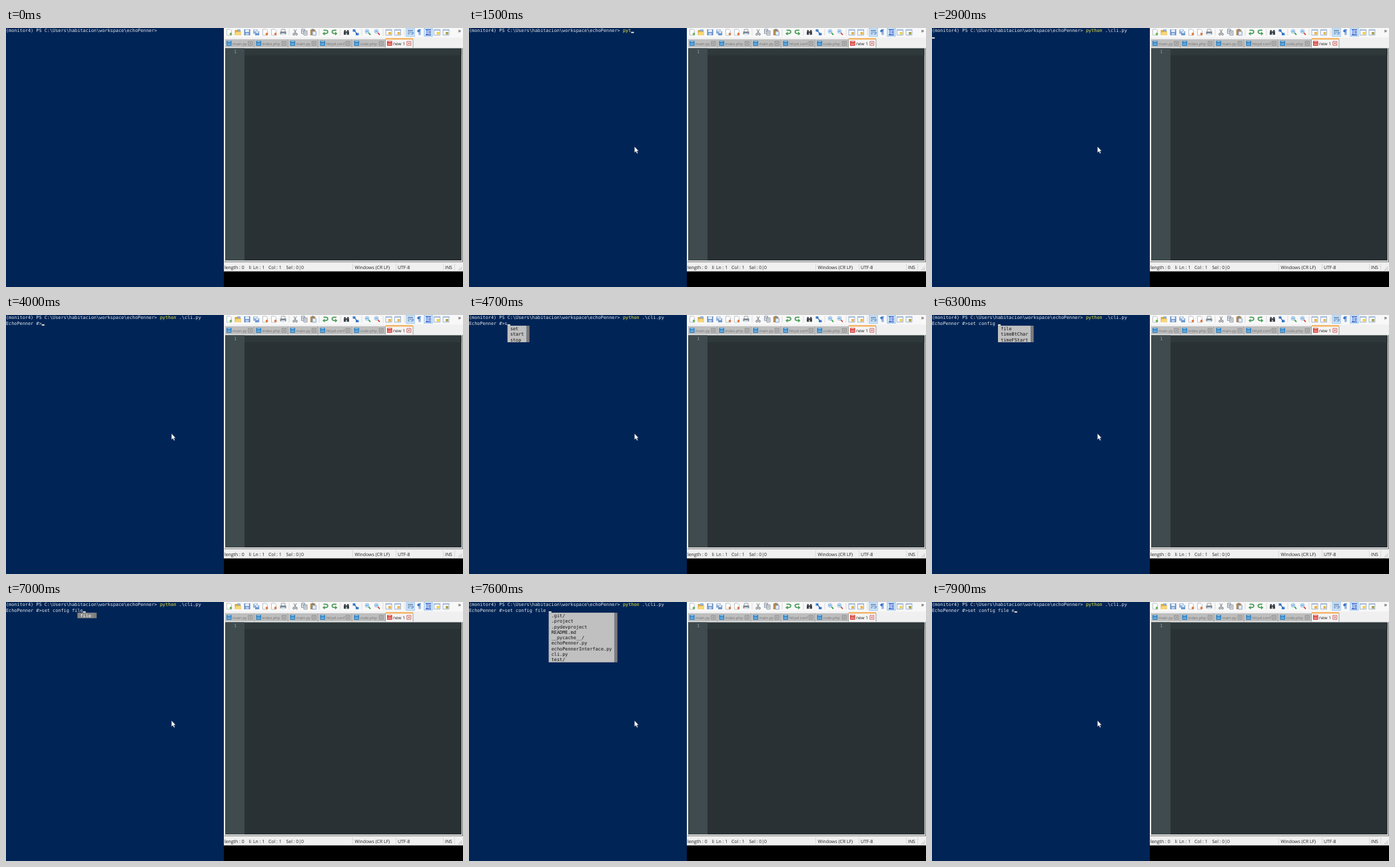
Animation, 686 px wide and 390 px high, one loop 8 s. Source, as an HTML page:

```html
<!DOCTYPE html>
<html lang="en">
<head>
<meta charset="utf-8">
<title>Terminal and editor</title>
<style>
  html, body { margin: 0; width: 100%; height: 100%; overflow: hidden; background: #000; }
  svg { display: block; width: 686px; height: 390px; }
  text { white-space: pre; text-rendering: geometricPrecision; }
  .mono { font: 6.85px "DejaVu Sans Mono", "Liberation Mono", monospace; }
  .ui { font: 6.9px "Open Sans", "Noto Sans", sans-serif; }
</style>
</head>
<body>
<svg id="stage" viewBox="0 0 686 390"></svg>
<script>
const NS = "http://www.w3.org/2000/svg";
const stage = document.getElementById("stage");
const LOOP = 8000, CW = 4.125, RH = 8.3;

function add(tag, attrs, parent = stage) {
  const el = document.createElementNS(NS, tag);
  for (const k in attrs) el.setAttribute(k, attrs[k]);
  return parent.appendChild(el);
}
const rect = (x, y, width, height, fill, parent) => add("rect", { x, y, width, height, fill }, parent);
const line = (d, stroke, w = 1, parent) => add("path", { d, stroke, fill: "none", "stroke-width": w }, parent);
const shape = (d, fill, parent) => add("path", { d, fill }, parent);
function label(str, x, y, fill, size) {
  const el = add("text", { x, y, fill, class: "ui" });
  if (size) el.style.fontSize = size + "px";
  el.textContent = str;
}
function mono(str, col, row, fill, parent) {
  const el = add("text", { x: col * CW, y: 6.3 + row * RH, fill, class: "mono" }, parent);
  el.textContent = str;
  return el;
}

/* ---------- editor window ---------- */
rect(327, 0, 359, 366.5, "#f0f0f0");
rect(327, 0, 359, 14.5, "#f8f8f8");

const icons = {
  page(x, mark) {
    shape(`M${x - 3.5} 2h5l2 2v7h-7z`, "#fff");
    line(`M${x - 3.5} 2h5l2 2v7h-7z`, "#a3abb2", .7);
    add("circle", { cx: x + 2.5, cy: 9, r: 1.9, fill: mark });
  },
  folder(x) {
    shape(`M${x - 4.5} 3h4l1 1.5h4v6.5h-9z`, "#d9a741");
    shape(`M${x - 3} 6h8l-1.5 5h-8z`, "#f7d778");
    rect(x - 1, 2, 5, 3, "#8db4dc");
  },
  disk(x) {
    rect(x - 4.5, 2, 9, 9, "#5d88c6");
    rect(x - 2.9, 2.4, 5.8, 3.8, "#e8f1fb");
    rect(x - 2.5, 7.5, 5, 3, "#c6d8ee");
  },
  disks(x) {
    for (const d of [-4.5, -2]) {
      rect(x + d, d + 6.5, 7, 7, "#fff");
      rect(x + d + .4, d + 6.9, 6.2, 6.2, "#6d97cc");
      rect(x + d + 1.6, d + 7.3, 3.8, 2.3, "#eaf2fb");
    }
  },
  printer(x) {
    rect(x - 2.8, 2, 5.6, 4, "#fff");
    line(`M${x - 2.8} 5.5v-3.5h5.6v3.5`, "#7f8a94", .8);
    rect(x - 4.5, 5.3, 9, 4.2, "#7b8791");
    rect(x - 2.8, 8, 5.6, 3, "#dde6ee");
  },
  cut(x) {
    line(`M${x - 2} 2l3.2 6M${x + 2} 2l-3.2 6`, "#7d858c", 1);
    for (const s of [-2, 2]) add("circle", { cx: x + s, cy: 9.4, r: 1.4, fill: "none", stroke: "#66707a" });
  },
  copy(x) {
    for (const [dx, dy] of [[-4, 1.8], [-.5, 4.3]]) {
      rect(x + dx, dy, 5, 6.5, "#f2f6fb");
      line(`M${x + dx} ${dy}h5v6.5h-5zM${x + dx + 1} ${dy + 2}h3m-3 2h3`, "#707c8c", .8);
    }
  },
  paste(x) {
    rect(x - 4.2, 2.3, 7.5, 8.7, "#b98a4a");
    rect(x - 2.2, 1.5, 3.5, 2, "#77808a");
    rect(x - 1, 5, 5.4, 6, "#e4eefa");
    line(`M${x - 1} 5h5.4v6h-5.4z`, "#5f83b8", .7);
  },
  turn(x, s) {
    line(`M${x - 3 * s} 3.4h${3.5 * s}q${3 * s} 0 ${3 * s} 2.4t${-3 * s} 2.6h${-2 * s}`, "#4c9d5b", 1.6);
    shape(`M${x - 4.5 * s} 8.4l${3.5 * s} -2.8v5.6z`, "#4c9d5b");
  },
  find(x) {
    for (const d of [-4, .6]) {
      rect(x + d + .6, 3, 2.2, 3, "#3b4148");
      rect(x + d, 5.2, 3.4, 5, "#3b4148");
    }
    rect(x - 1, 5.2, 2, 2, "#3b4148");
  },
  replace(x) {
    rect(x - 4.5, 2, 4, 3.5, "#3c7ed0");
    rect(x, 7.5, 4.5, 3.5, "#3c7ed0");
    line(`M${x - 2} 4l4 5`, "#28559b", 1.2);
  },
  zoom(x, c) {
    line(`M${x + 1} 7l3 3.4`, c, 1.8);
    add("circle", { cx: x - 1, cy: 5, r: 2.9, fill: "#d8ebfa", stroke: "#7fb0da", "stroke-width": .8 });
    rect(x - 2.5, 4.3, 3, 1.4, "#4a8fd0");
  },
  pane(x, mark) {
    rect(x - 4.5, 2, 9, 8.8, "#fdfdfd");
    line(`M${x - 4.5} 2.3h9v8.5h-9zM${x - 4.5} 3.4h9`, "#86a3c8", .8);
    rect(x - .5, 6, 4, 3.8, mark);
  },
  pressed(x) {
    rect(x - 6.2, .2, 12.4, 12.4, "#cfe5f9");
    line(`M${x - 6.2} .2h12.4v12.4h-12.4z`, "#80b7e8", .7);
  },
  wrap(x) {
    icons.pressed(x);
    line(`M${x - 4} 3.5h8M${x - 4} 6h5M${x - 4} 8.7h3`, "#4c6790", 1.1);
    line(`M${x + 1} 6h3v3h-3.5`, "#3a74c4", 1);
  },
  pilcrow(x) {
    line(`M${x} 2.5v8M${x + 1.8} 2.5v8M${x - 1} 2.6h4`, "#3a76c8", .9);
    add("circle", { cx: x - .8, cy: 4.5, r: 1.9, fill: "#3a76c8" });
  },
  indent(x) {
    icons.pressed(x);
    line(`M${x - 4} 2.5h8M${x} 5h4M${x} 7.5h4M${x - 4} 10.3h8`, "#1d3fb8", 1.2);
    line(`M${x - 2} 2.5v8`, "#2b56dd", 1);
  }
};

icons.page(335, "#69b35e");
icons.folder(348);
icons.disk(362);
icons.disks(375.5);
icons.page(389, "#e07840");
icons.page(402, "#e07840");
icons.printer(416);
icons.cut(434);
icons.copy(447.5);
icons.paste(461);
icons.turn(479.5, 1);
icons.turn(493, -1);
icons.find(511);
icons.replace(525);
icons.zoom(543, "#3b9d46");
icons.zoom(557, "#d2453c");
icons.pane(574.5, "#e8b64c");
icons.pane(588, "#e8b64c");
icons.wrap(607);
icons.pilcrow(620);
icons.indent(634);
icons.pane(647, "#f0cf45");
icons.pane(660.5, "#a6a452");
for (const x of [425, 470, 502, 534, 566, 598]) line(`M${x} 1.5v10`, "#d2d2d2", .8);
label("»", 678.5, 6.5, "#222", 9);

function tab(x, w, name, active) {
  rect(x, active ? 15.5 : 17, w, active ? 14 : 12, active ? "#f4f4f4" : "#bebebe");
  line(`M${x + w} 17v12.5`, "#8f8f8f", .8);
  if (active) rect(x, 15.5, w, 1.8, "#f6a23a");
  rect(x + 2, 19.5, 7.6, 7.2, active ? "#d8423c" : "#2c82c4");
  rect(x + 3.6, 19.8, 4.4, 1.6, active ? "#efa39e" : "#86bee6");
  rect(x + 3.2, 23.6, 5.2, 1.3, active ? "#f3c4c0" : "#a5cdea");
  label(name, x + 11, 25.6, active ? "#222" : "#747474", active ? 6.5 : 5.8);
  const cx = x + w - 6.2, k = active ? "#c9504c" : "#858585";
  line(`M${cx - 3} 20.2h6v6h-6z`, k, .8);
  line(`M${cx - 1.5} 21.7l3 3m0 -3l-3 3`, k, .9);
}
tab(329, 44, "main.py");
tab(373.5, 50, "index.php");
tab(424.5, 44, "main.py");
tab(469.5, 50, "httpd.conf");
tab(520.5, 49, "code.php");
tab(570, 41, "new 1", true);

// Light bevel around the text area, with a grey outer edge.
line("M685.5 30v322H328", "#6c6c6c", 1);
rect(329, 30.5, 354.8, 319.5, "#293134");
rect(329, 30.5, 29, 319.5, "#3f4b4e");
rect(358, 31, 325.8, 10, "#2f393c");
mono("1", 342 / CW, 3.85, "#8a9da1");

const status = [[328, "length : 0"], [364.5, "li"], [371, "Ln : 1"], [394, "Col : 1"], [420.5, "Sel : 0|0"],
  [523.5, "Windows (CR LF)"], [588, "UTF-8"], [659, "INS"]];
for (const [x, s] of status) label(s, x, 362.6, "#1c1c1c");
for (const x of [520.5, 585.5, 656.5, 673.5]) line(`M${x} 354.5v10`, "#d4d4d4", .8);
for (let i = 0; i < 3; i++)
  for (let j = 0; j <= i; j++) rect(683 - j * 2, 359.5 + i * 2, 1.1, 1.1, "#b0b0b0");

/* ---------- terminal ---------- */
rect(0, 0, 327, 390, "#012456");
const FG = "#e6e8ea";
mono("(monitor4) PS C:\\Users\\habitacion\\workspace\\echoPenner>", 0, 0, FG);
const command = mono("", 56, 0, "#f3ee3f");
const args = mono("", 62, 0, FG);
const input = mono("", 0, 1, FG);
const caret = rect(0, 0, CW, 1.8, "#f2f0d8");
const popup = add("g", {});
const mouse = add("path", {
  d: "M248.4 178.4v9.4l2.1-2 1.5 3.3 1.5-.7-1.5-3.2h2.6z",
  fill: "#fff", stroke: "#14213a", "stroke-width": .3
});

const PS = "EchoPenner #>";
const VERBS = ["set", "start", "stop"];
const KEYS = ["file", "timeBtChar", "timeFStart"];
const FILES = [".git/", ".project", ".pydevproject", "README.md", "__pycache__/",
  "echoPenner.py", "echoPennerInterface.py", "cli.py", "test/"];

// [time, shell input, prompt line, menu items, menu column, item selected]
// A null prompt line keeps the caret on the shell line.
const RUN = "python .\\cli.py";
const steps = [
  [0, "", null],
  [1200, "", null],
  [1300, "p", null],
  [1400, "py", null],
  [1500, "pyt", null],
  [1600, "pyth", null],
  [1800, RUN, null],
  [2700, RUN, ""],
  [3300, RUN, PS],
  [4700, RUN, PS + "s", VERBS, 14],
  [4800, RUN, PS + "se", ["set"], 15],
  [4900, RUN, PS + "set"],
  [5000, RUN, PS + "set", ["set"], 16],
  [5300, RUN, PS + "set "],
  [5400, RUN, PS + "set ", ["config"], 17],
  [5500, RUN, PS + "set c", ["config"], 18],
  [5600, RUN, PS + "set co", ["config"], 19],
  [5700, RUN, PS + "set con", ["config"], 20],
  [5900, RUN, PS + "set config", ["config"], 20, true],
  [6300, RUN, PS + "set config ", KEYS, 24],
  [6600, RUN, PS + "set config f", ["file"], 25],
  [6700, RUN, PS + "set config fi", ["file"], 26],
  [6900, RUN, PS + "set config file", ["file"], 26, true],
  [7200, RUN, PS + "set config file "],
  [7300, RUN, PS + "set config file ", FILES, 29],
  [7800, RUN, PS + "set config file e"]
];

function drawMenu(items, col, picked) {
  popup.replaceChildren();
  if (!items) return;
  const width = (Math.max(...items.map(s => s.length)) + 2) * CW;
  const x = col * CW, y = 2 * RH - .5, h = items.length * RH;
  rect(x, y, width, h, picked ? "#868686" : "#c0c0c0", popup);
  rect(x + width, y, CW, h, "#7c7c7c", popup);
  items.forEach((s, i) => mono(s, col + 1, 2 + i, picked ? "#fff" : "#101010", popup));
}

let shown = -1;
function render(t) {
  let i = steps.length - 1;
  while (steps[i][0] > t) i--;
  if (i === shown) return;
  shown = i;
  const [, typed, prompt, items, col, picked] = steps[i];
  command.textContent = typed.slice(0, 6);
  args.textContent = typed.slice(6);
  input.textContent = prompt || "";
  const row = prompt === null ? 0 : 1;
  caret.setAttribute("x", (row ? prompt.length : 56 + typed.length) * CW);
  caret.setAttribute("y", row * RH + 5.8);
  const focused = i > 0 ? "visible" : "hidden";
  caret.setAttribute("visibility", focused);
  mouse.setAttribute("visibility", focused);
  drawMenu(items, col, picked);
}

const start = performance.now();
function tick() {
  render((performance.now() - start) % LOOP);
  requestAnimationFrame(tick);
}
tick();
</script>
</body>
</html>
```
